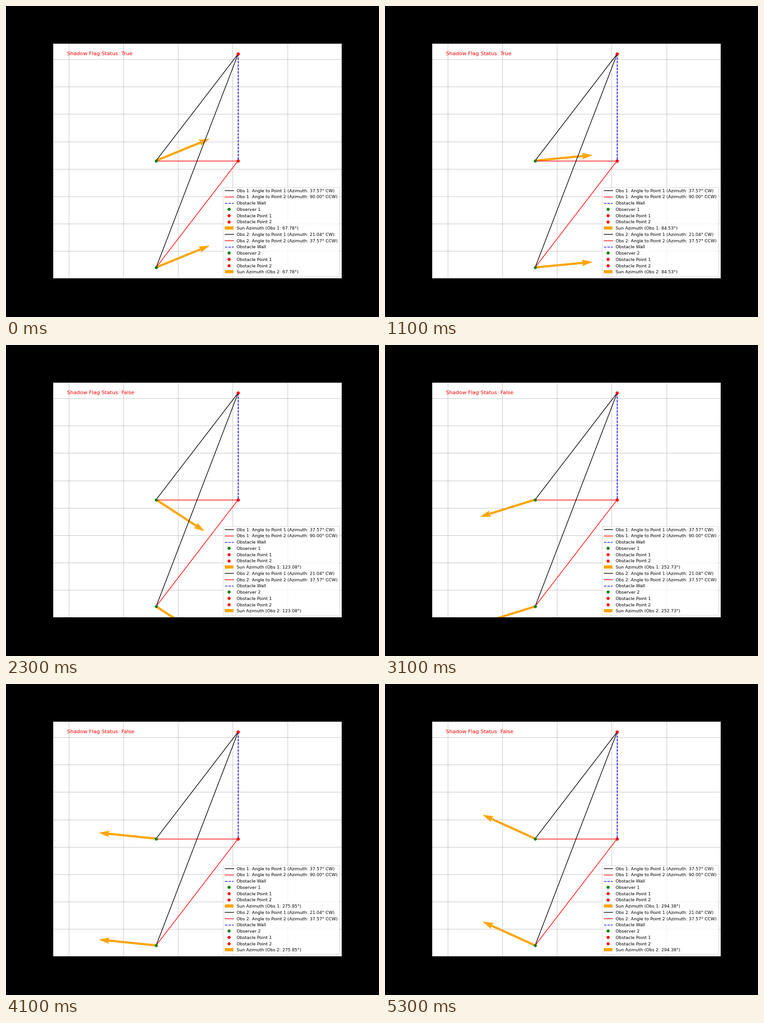
A matplotlib script that plays this animation: 820 by 683 pixels, repeating every 5.4 s.

```python
import math

import matplotlib.pyplot as plt
from matplotlib.animation import FuncAnimation

# 12 x 10 inches at this resolution gives 820 x 683 whole pixels
FIG_W, FIG_H, DPI = 12, 10, 820 / 12
AX_W, AX_H = 0.775, 0.755
FRAMES, INTERVAL = 54, 100

OBSERVERS = [(1.2, 4.3), (1.2, 0.4)]
POINT_1, POINT_2 = (4.2, 8.2), (4.2, 4.3)

# Solar geometry: one frame is a quarter of an hour
NOON = 25.8542
SIN_LAT = 0.4765
COS_LAT = math.sqrt(1 - SIN_LAT ** 2)


def sun_azimuth(frame):
    """Azimuth in degrees clockwise from north."""
    hour = math.radians(3.75 * (frame - NOON))
    tan_dec = 0.395719 - 3.435e-5 * frame
    south = math.cos(hour) * SIN_LAT - tan_dec * COS_LAT
    return 180 + math.degrees(math.atan2(math.sin(hour), south))


def bearing(start, end):
    return math.degrees(math.atan2(end[0] - start[0], end[1] - start[1]))


def sun_label(number, azimuth):
    return f"Sun Azimuth (Obs {number}: {azimuth:.2f}°)"


def direction(azimuth):
    angle = math.radians(azimuth)
    return math.sin(angle), math.cos(angle)


def segment(start, end, style, label):
    ax.plot([start[0], end[0]], [start[1], end[1]], style, label=label)


def draw_observer(number, pos):
    """Draw one observer's sight lines, wall and points; return the sun arrow."""
    to_1, to_2 = bearing(pos, POINT_1), bearing(pos, POINT_2)
    prefix = f"Obs {number}: Angle to Point"
    segment(pos, POINT_1, "k-", f"{prefix} 1 (Azimuth: {to_1:.2f}° CW)")
    segment(pos, POINT_2, "r-", f"{prefix} 2 (Azimuth: {to_2:.2f}° CCW)")
    segment(POINT_1, POINT_2, "b--", "Obstacle Wall")
    ax.plot(*pos, "go", label=f"Observer {number}")
    ax.plot(*POINT_1, "ro", label="Obstacle Point 1")
    ax.plot(*POINT_2, "ro", label="Obstacle Point 2")
    azimuth = sun_azimuth(0)
    return ax.quiver(*pos, *direction(azimuth), scale=5, color="orange",
                     label=sun_label(number, azimuth))


def in_shadow(azimuth):
    return any(bearing(pos, POINT_1) <= azimuth <= bearing(pos, POINT_2)
               for pos in OBSERVERS)


fig = plt.figure(figsize=(FIG_W, FIG_H), dpi=DPI, facecolor="black")
ax = fig.add_axes([0.125, 0.125, AX_W, AX_H])

arrows = [draw_observer(i, pos) for i, pos in enumerate(OBSERVERS, 1)]

# Equal scale on both axes, centred on the scene
half_y = 4.29
half_x = half_y * (AX_W * FIG_W) / (AX_H * FIG_H)
ax.set_xlim(2.7 - half_x, 2.7 + half_x)
ax.set_ylim(4.3 - half_y, 4.3 + half_y)
ax.set_xticks(range(-2, 8, 2))
ax.set_yticks(range(1, 9))
ax.tick_params(labelbottom=False, labelleft=False)
ax.grid(True)

legend = ax.legend(loc="lower right", fontsize=10)
sun_texts = legend.get_texts()[6::7]
status = ax.text(0.05, 0.95, "", transform=ax.transAxes, fontsize=12, color="red")


def update(frame):
    azimuth = sun_azimuth(frame)
    for number, (arrow, text) in enumerate(zip(arrows, sun_texts), 1):
        arrow.set_UVC(*direction(azimuth))
        text.set_text(sun_label(number, azimuth))
    status.set_text(f"Shadow Flag Status: {in_shadow(azimuth)}")
    return [*arrows, *sun_texts, status]


anim = FuncAnimation(fig, update, frames=FRAMES, interval=INTERVAL,
                     repeat=True, repeat_delay=0, blit=False)
plt.show()
```
